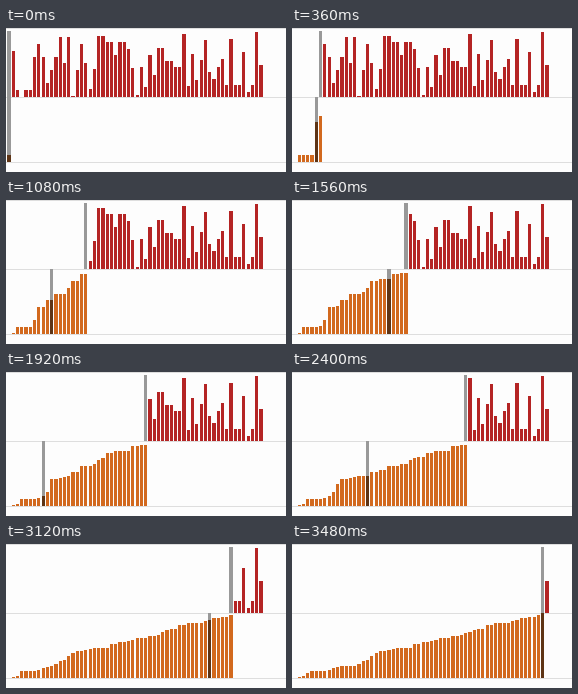
A matplotlib script that plays this animation: 280 by 144 pixels, repeating every 3.6 s.

```python
import matplotlib.pyplot as plt
from matplotlib.animation import FuncAnimation

W, H, DPI = 280, 144, 100
FRAMES, INTERVAL = 30, 120
PITCH, BAR, LEFT = 4.27, 3.2, 3.0
ROW = 66
TOP_BASE, LOW_BASE = 69, 134

VALUES = [
    7, 46, 7, 0, 7, 7, 40, 53, 40, 14, 27, 40,
    60, 34, 60, 1, 27, 53, 34, 8, 28, 61, 61, 55,
    55, 42, 55, 55, 48, 29, 2, 30, 10, 42, 22, 49,
    49, 36, 36, 30, 30, 63, 11, 43, 17, 37, 57, 25,
    18, 30, 38, 12, 58, 12, 12, 45, 5, 12, 65, 32,
]

fig = plt.figure(figsize=(W / DPI, H / DPI), dpi=DPI, facecolor="#fdfdfd")
ax = fig.add_axes([0, 0, 1, 1])
ax.set_xlim(0, W)
ax.set_ylim(H, 0)
ax.axis("off")

for y in (0, TOP_BASE, LOW_BASE):
    ax.add_patch(plt.Rectangle((0, y - 0.5), W, 1, color="#dedede", lw=0))


def make_bar(i, color, z=2):
    x = LEFT + i * PITCH - BAR / 2
    return ax.add_patch(plt.Rectangle((x, 0), BAR, 0, fc=color, lw=0, zorder=z))


def place(bar, base, height, i=None):
    bar.set_y(base - height)
    bar.set_height(height)
    if i is not None:
        bar.set_x(LEFT + i * PITCH - BAR / 2)


pending = [make_bar(i, "#b42424") for i in range(len(VALUES))]
ordered = [make_bar(i, "#d2691e") for i in range(len(VALUES))]
reader = make_bar(0, "#999999", 3)
slot = make_bar(0, "#999999", 1)
overlap = make_bar(0, "#5e3415", 3)


def update(k):
    """Insertion sort, showing every second insertion."""
    cur = 2 * k
    done = sorted(VALUES[:cur + 1])
    pos = sum(v <= VALUES[cur] for v in done) - 1
    for i, value in enumerate(VALUES):
        place(pending[i], TOP_BASE, value if i > cur else 0)
        place(ordered[i], LOW_BASE, done[i] if i <= cur else 0)
    place(reader, TOP_BASE, ROW, cur)
    place(slot, LOW_BASE, ROW - 1, pos)
    place(overlap, LOW_BASE, VALUES[cur], pos)
    return pending + ordered + [reader, slot, overlap]


anim = FuncAnimation(fig, update, frames=FRAMES, interval=INTERVAL,
                     repeat=True, repeat_delay=0, blit=False)
plt.show()
```
